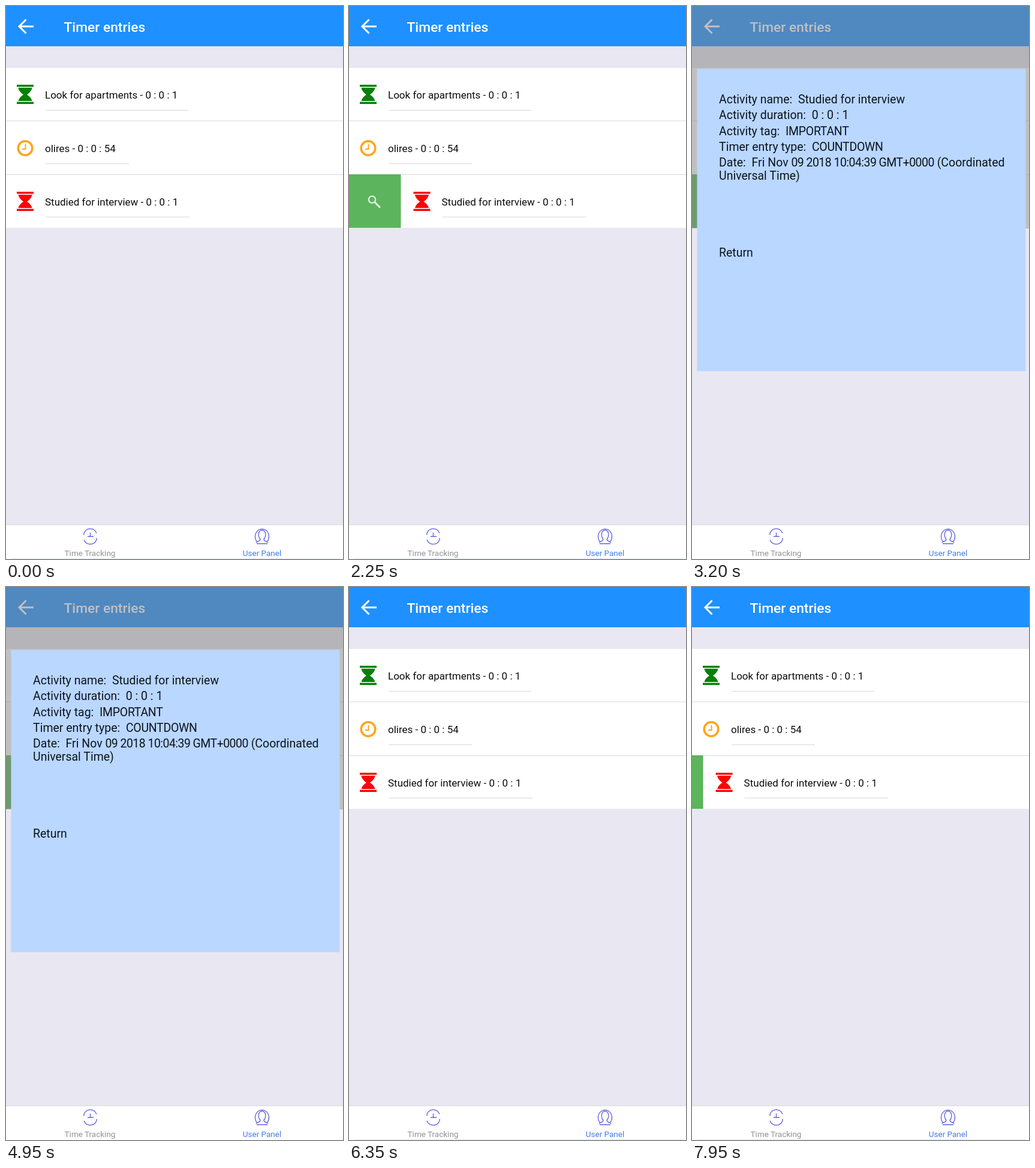
An HTML page that plays this animation: 562 px wide and 920 px high, repeating every 8000 ms.

```html
<!DOCTYPE html>
<html lang="en">
<head>
<meta charset="utf-8">
<title>Timer entries</title>
<style>
  html, body { margin: 0; width: 100%; height: 100%; overflow: hidden; background: #fff; }
  svg { display: block; width: 562px; height: 920px; font-family: Roboto, "Noto Sans", sans-serif; }
  text { white-space: pre; }
  .entry { font-size: 17px; fill: #0c0c0c; }
  .detail { font-size: 19.5px; fill: #0b1420; }
  .caps { letter-spacing: -.015em; }
  .date { letter-spacing: -.028em; }
  .tab { font-size: 13.5px; text-anchor: middle; }
  .line { stroke: #d8d8d8; }
  .icon { fill: none; }
</style>
</head>
<body>
<svg viewBox="0 0 562 920">
  <defs>
    <path id="hourglass" d="M18 131h28v3.500H18zM18 159.500h28v3.500H18zM20.500 136h23c-1 5-4 8-8.500 11.500c4.500 3 7.500 6 8.500 10.500h-23c1-4.500 4-7.500 8.500-10.500c-4.500-3.500-7.500-6.500-8.500-11.500z"/>
  </defs>

  <rect width="562" height="920" fill="#e9e7f1"/>
  <rect width="562" height="67" fill="#1e90ff"/>
  <path class="icon" d="M46 34H22M33.500 22.500L22 34L33.500 45.500" stroke="#fff" stroke-width="3"/>
  <text x="96.500" y="43" font-size="22.800" font-weight="500" fill="#fff">Timer entries</text>

  <rect y="103" width="562" height="266" fill="#fff"/>
  <use href="#hourglass" fill="#088008"/>
  <text class="entry" x="65" y="154">Look for apartments - 0 : 0 : 1</text>
  <path class="line" d="M66 173.500H304M0 191H562"/>

  <g class="icon" stroke="#ffa51a">
    <circle cx="32" cy="236.500" r="11.800" stroke-width="3.600"/>
    <path d="M32.500 230V238H27" stroke-width="2"/>
  </g>
  <text class="entry" x="65" y="243">olires - 0 : 0 : 54</text>
  <path class="line" d="M66 262.500H205"/>

  <rect y="280" width="562" height="89" fill="#5cb45c"/>
  <g class="icon" stroke="#e4f3e4" stroke-width="2.300">
    <circle cx="38.500" cy="322" r="5.700"/>
    <path d="M42.500 326L52 335.500" stroke-width="2.800"/>
  </g>
  <rect id="cover" y="280" width="562" height="89" fill="#fff"/>
  <g id="entry">
    <use href="#hourglass" y="178" fill="#fa0505"/>
    <text class="entry" x="65" y="332">Studied for interview - 0 : 0 : 1</text>
    <path class="line" d="M66 351H306M-3 280.500H562"/>
  </g>

  <rect y="863" width="562" height="57" fill="#fff"/>
  <path d="M0 863H562" stroke="#d6d6da"/>
  <g class="icon" stroke="#5d5de0" stroke-width="1.300">
    <path d="M130 880V877A11.500 12.500 0 0 1 151 877M130 888A11.500 12.500 0 0 0 151 888V885M140.500 876V882.500M136 882.500H146"/>
    <path d="M418.500 891A11.500 12.500 0 1 1 435.500 891M417 893C419 890 424 891 424 887C420 883 420 872 427 872C434 872 434 883 430 887C430 891 435 890 437 893M418 894.500H436"/>
  </g>
  <text class="tab" x="140" y="915" fill="#929296">Time Tracking</text>
  <text class="tab" x="427" y="915" fill="#427de8">User Panel</text>

  <rect id="backdrop" width="562" height="370" fill="#828282"/>
  <g id="modal">
    <rect x="8.500" y="104.500" width="548" height="503" fill="#bad7ff"/>
    <g class="detail">
      <text x="45" y="162">Activity name:  Studied for interview</text>
      <text x="45" y="188">Activity duration:  0 : 0 : 1</text>
      <text x="45" y="214.500">Activity tag:  <tspan class="caps">IMPORTANT</tspan></text>
      <text x="45" y="240.500">Timer entry type:  <tspan class="caps">COUNTDOWN</tspan></text>
      <text x="45" y="266.500">Date:  Fri Nov <tspan class="date">09 2018 10:04:39 GMT+0000</tspan> (Coordinated</text>
      <text x="45" y="289">Universal Time)</text>
      <text x="45" y="417">Return</text>
    </g>
  </g>
</svg>
<script>
  const LOOP = 8000, ROW_OPEN = 89.5, MODAL_TRAVEL = 815;
  const [cover, entry, backdrop, modal] =
    ["cover", "entry", "backdrop", "modal"].map(id => document.getElementById(id));

  const progress = (t, from, to) => Math.min(1, Math.max(0, (t - from) / (to - from)));
  const easeInOut = p => p < .5 ? 2 * p * p : 1 - 2 * (1 - p) ** 2;
  const easeOut = p => 1 - (1 - p) ** 3;

  function render(t) {
    const swipe = easeInOut(progress(t, 1450, 2250)) - easeOut(progress(t, 5750, 6300))
      + easeInOut(progress(t, 7680, 8460));
    const offset = ROW_OPEN * swipe;
    cover.setAttribute("x", Math.max(0, offset - 3));
    entry.setAttribute("transform", `translate(${offset} 0)`);

    const shown = easeOut(progress(t, 2500, 2980)) - easeInOut(progress(t, 5173, 5573));
    modal.setAttribute("transform", `translate(0 ${MODAL_TRAVEL * (1 - shown)})`);
    const dim = progress(t, 2500, 2900) - progress(t, 5100, 5450);
    backdrop.setAttribute("opacity", .5 * dim);
  }

  function tick() {
    render(performance.now() % LOOP);
    requestAnimationFrame(tick);
  }
  tick();
</script>
</body>
</html>
```
